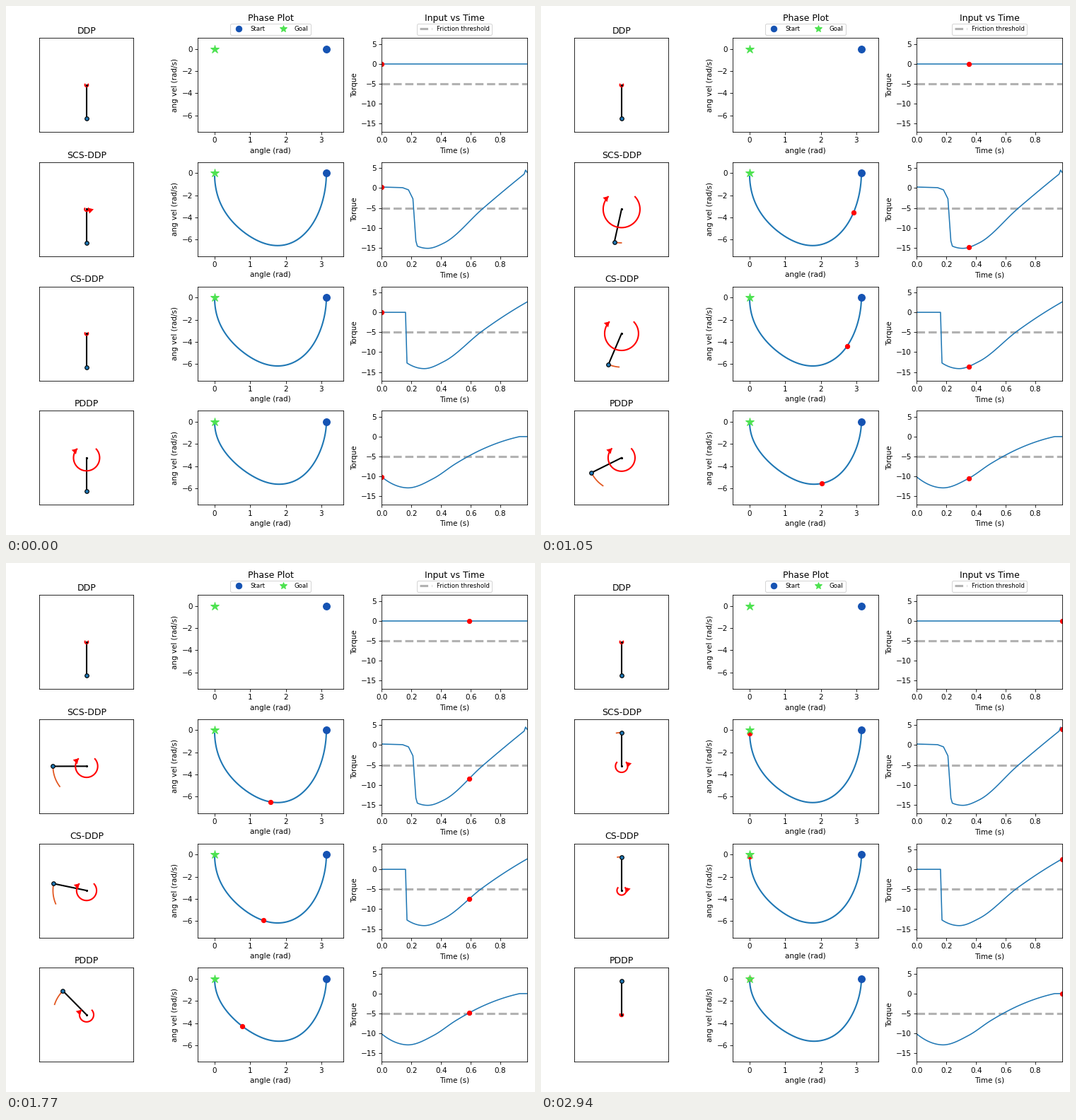
Recreate the animation shown at these times as a matplotlib script. Size 748 by 748 pixels, loop 2970 ms.

```python
import numpy as np
import matplotlib.pyplot as plt
from matplotlib.animation import FuncAnimation

STEPS, DT = 99, 0.01
T = np.arange(STEPS) * DT
TRAIL = 10
GRAVITY, DRIVE = 14.7, 3.0
SUBSTEPS = 5

plt.rcParams["font.family"] = "DejaVu Sans"


def smooth(points):
    """Cubic curve through a few points, slopes taken from neighbours."""
    x, y = np.array(points).T
    d = np.gradient(y, x, edge_order=2)
    i = np.clip(np.searchsorted(x, T, side="right") - 1, 0, len(x) - 2)
    h = x[i + 1] - x[i]
    s = (T - x[i]) / h
    return ((1 + 2 * s) * (1 - s) ** 2 * y[i] + s * (1 - s) ** 2 * h * d[i]
            + s * s * (3 - 2 * s) * y[i + 1] + s * s * (s - 1) * h * d[i + 1])


def torque(body, head=(), tail=()):
    """Smooth body between straight head and tail pieces."""
    straight = np.interp(T, *np.array([*head, *body, *tail]).T)
    inside = (T > body[0][0] - 1e-9) & (T < body[-1][0] + 1e-9)
    return np.where(inside, smooth(body), straight)


def simulate(u, friction):
    """Pendulum swung from hanging, held by dry friction when it stops."""
    theta, omega, h = np.pi, 0.0, DT / SUBSTEPS
    states = []
    for push in u:
        states.append((theta, omega))
        for _ in range(SUBSTEPS):
            acc = GRAVITY * np.sin(theta) + DRIVE * (push + friction)
            new = min(omega + h * acc, 0.0)
            theta += h * (omega + new) / 2
            omega = new
    return np.array(states).T


def swing_up(u):
    """Find the friction that lets the swing end upright."""
    low, high = 4.0, 6.0
    for _ in range(40):
        mid = (low + high) / 2
        if simulate(u, mid)[0, -1] < 0:
            low = mid
        else:
            high = mid
    return simulate(u, high)


idle = np.zeros(STEPS)
scs = torque([(.24, -14.6), (.31, -15.15), (.42, -13.8), (.68, -5.2), (.96, 3.5)],
             head=[(0, .25), (.14, .1), (.18, -.45), (.21, -2.7), (.23, -13.3)],
             tail=[(.97, 4.5), (.98, 3.96)])
cs = torque([(.17, -12.74), (.285, -14.15), (.42, -12.35), (.68, -4.64), (.98, 2.6)],
            head=[(0, 0), (.16, 0)])
pddp = torque([(0, -10.15), (.17, -12.88), (.35, -10.5), (.5, -6.77),
               (.68, -3.15), (.93, 0)],
              tail=[(.98, 0)])


def legend(ax, **kw):
    ax.legend(loc="lower center", bbox_to_anchor=(0.5, 1), fontsize="small", **kw)


class Row:
    def __init__(self, axes, name, u, motion, first):
        self.u = u
        self.theta, self.omega = motion
        self.x, self.y = -np.sin(self.theta), np.cos(self.theta)
        self.draw_pendulum(axes[0], name)
        self.draw_phase(axes[1], first)
        self.draw_input(axes[2], first)

    def draw_pendulum(self, ax, name):
        ax.set(xlim=(-1.4, 1.4), ylim=(-1.4, 1.4), xticks=[], yticks=[],
               aspect="equal", title=name)
        self.trail, = ax.plot([], [], color="#e2561f", lw=1.7)
        self.rod, = ax.plot([], [], color="black", lw=2)
        self.arc, = ax.plot([], [], color="red", lw=2, solid_capstyle="butt")
        self.head, = ax.fill([0, 0, 0], [0, 0, 0], color="red", lw=0, zorder=3)
        ax.plot(0, 0, "ko", ms=2, zorder=4)
        self.bob, = ax.plot([], [], "o", ms=5.4, mfc="tab:blue", mec="black",
                            mew=1.1, zorder=4)

    def draw_phase(self, ax, first):
        ax.plot(self.theta, self.omega, color="tab:blue", lw=2)
        self.state, = ax.plot([], [], "ro")
        ax.plot(np.pi, 0, "o", color="#1553b3", ms=9.5, ls="", zorder=3,
                label="Start")
        ax.plot(0, 0, "*", color="#4de250", ms=12, ls="", zorder=3,
                label="Goal")
        ax.set(xlim=(-.15 * np.pi, 1.15 * np.pi), ylim=(-7.5, 1),
               xticks=range(4), yticks=[-6, -4, -2, 0],
               xlabel="angle (rad)", ylabel="ang vel (rad/s)")
        if first:
            ax.set_title("Phase Plot", pad=23)
            legend(ax, ncol=2, markerscale=.85)

    def draw_input(self, ax, first):
        ax.axhline(-5, color="#b2b2b2", lw=3, ls="--",
                   label="Friction threshold")
        ax.plot(T, self.u, color="tab:blue", lw=1.5)
        self.now, = ax.plot([], [], "ro")
        ax.set(xlim=(0, .98), ylim=(-17.15, 6.5),
               xticks=[0, .2, .4, .6, .8], yticks=[-15, -10, -5, 0, 5],
               xlabel="Time (s)", ylabel="Torque")
        if first:
            ax.set_title("Input vs Time", pad=23)
            legend(ax)

    def update(self, k):
        x, y, u = self.x[k], self.y[k], self.u[k]
        past = slice(max(0, k - TRAIL), k + 1)
        self.trail.set_data(self.x[past], self.y[past])
        self.rod.set_data([0, x], [0, y])
        self.bob.set_data([x], [y])
        self.state.set_data([self.theta[k]], [self.omega[k]])
        self.now.set_data([T[k]], [u])
        self.turn(u)

    def turn(self, u):
        """Round arrow whose radius grows with the torque."""
        r = 0.05 + abs(u) / 30
        a = np.radians(np.linspace(135, 405, 80))
        self.arc.set_data(r * np.cos(a), r * np.sin(a))
        side = 1 if u > 0 else -1
        tip = r * np.sqrt(.5) * np.array([side, 1])
        ahead = np.sqrt(.5) * np.array([-side, 1])
        across = np.array([ahead[1], -ahead[0]])
        base = tip - .15 * ahead
        self.head.set_xy([tip, base + .092 * across, base - .092 * across])
        self.head.set_visible(abs(u) > 1e-9)


fig, grid = plt.subplots(4, 3, figsize=(10, 10), dpi=74.8, facecolor="white")
hanging = np.full(STEPS, np.pi), np.zeros(STEPS)
rows = [Row(grid[0], "DDP", idle, hanging, True)]
for axes, name, u in zip(grid[1:], ["SCS-DDP", "CS-DDP", "PDDP"], [scs, cs, pddp]):
    rows.append(Row(axes, name, u, swing_up(u), False))
fig.tight_layout()


def draw(k):
    for row in rows:
        row.update(k)
    return []


anim = FuncAnimation(fig, draw, frames=STEPS, interval=30, repeat=True,
                     repeat_delay=0)
plt.show()
```
